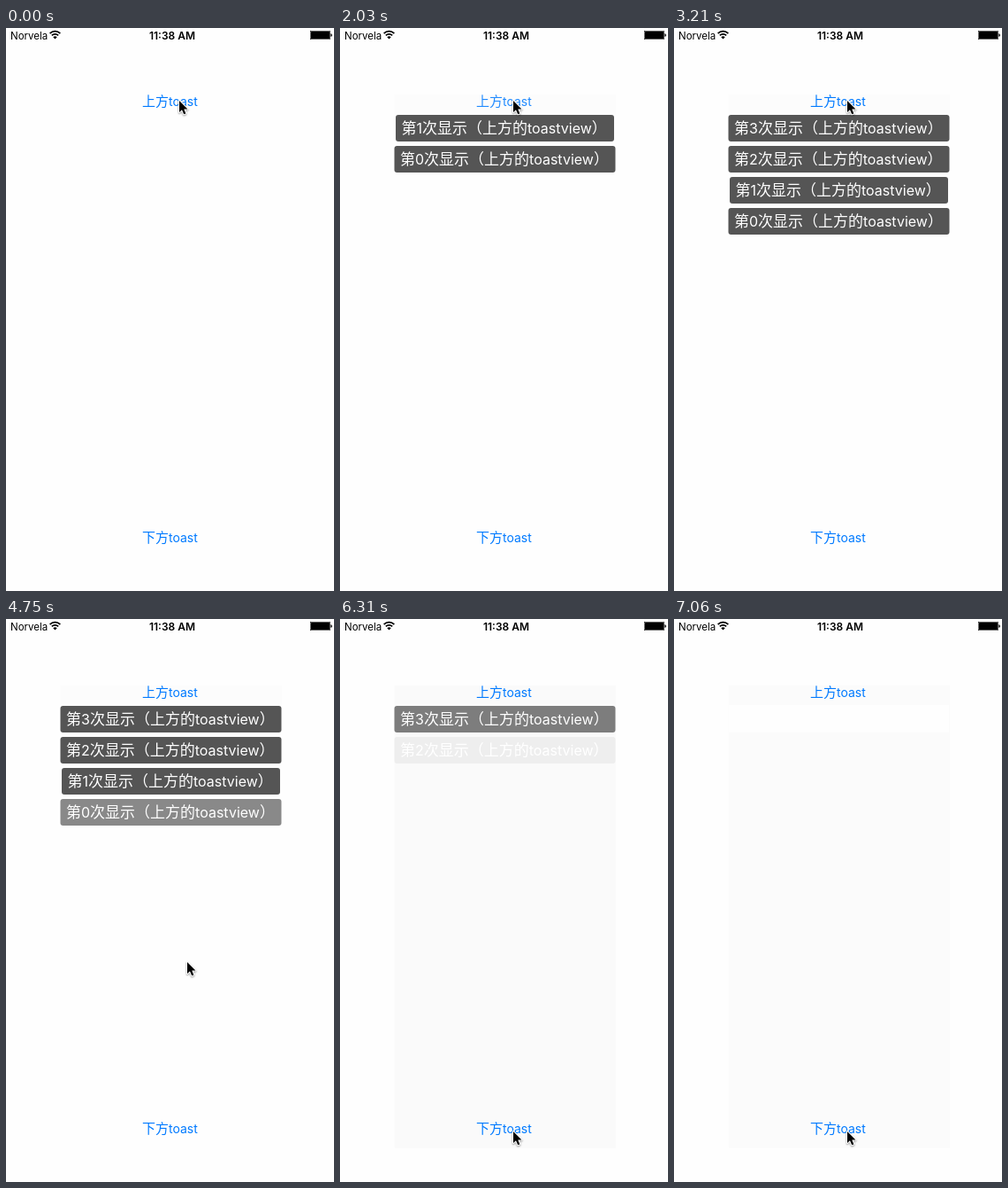
An HTML page with a canvas for the animation above (8 s loop, 371 px wide and 635 px high).

```html
<!DOCTYPE html>
<html lang="zh-CN">
<head>
<meta charset="utf-8">
<title>Toast stack</title>
<style>
  html, body { margin: 0; width: 100%; height: 100%; overflow: hidden; background: #fefefe; }
  canvas { display: block; width: 371px; height: 635px; }
</style>
</head>
<body>
<canvas id="stage"></canvas>
<script>
const WIDTH = 371, HEIGHT = 635, LOOP = 8000;
const PAPER = '#fefefe', BLUE = '#007aff';
const canvas = document.getElementById('stage');
const ctx = canvas.getContext('2d');
const ratio = window.devicePixelRatio || 1;
canvas.width = WIDTH * ratio;
canvas.height = HEIGHT * ratio;

const toasts = [
  { shown: 1400, fade: 4440, width: 250 },
  { shown: 1880, fade: 4920, width: 247 },
  { shown: 2200, fade: 5390, width: 250 },
  { shown: 3030, fade: 6070, width: 250 },
];
const FADE_TIME = 990;
const presses = [[1250, 1400], [1740, 1880], [2920, 3030]];

// Pointer stops: time, x, y
const pointerPath = [
  [0, 196, 82], [4370, 196, 82], [4720, 205, 387], [5180, 205, 387],
  [5720, 204, 566], [5930, 204, 569], [6120, 196, 578], [LOOP, 196, 578],
];

const clamp = v => Math.min(1, Math.max(0, v));
const smooth = v => v * v * (3 - 2 * v);

function pointerAt(t) {
  const i = pointerPath.findIndex(stop => t < stop[0]);
  const [t0, x0, y0] = pointerPath[i - 1], [t1, x1, y1] = pointerPath[i];
  const p = smooth((t - t0) / (t1 - t0));
  return { x: x0 + (x1 - x0) * p, y: y0 + (y1 - y0) * p };
}

function rect(x, y, w, h, color, radius = 0) {
  ctx.fillStyle = color;
  ctx.beginPath();
  ctx.roundRect(x, y, w, h, radius);
  ctx.fill();
}

function label(text, x, y, font, align = 'left') {
  ctx.font = font + ' Inter, sans-serif';
  ctx.textAlign = align;
  ctx.fillText(text, x, y);
}

// Chinese runs at full size, Latin runs one pixel smaller
function mixedText(text, x, y, size, color) {
  ctx.fillStyle = color;
  ctx.textAlign = 'left';
  for (const run of text.match(/[\x00-\x7f]+|[^\x00-\x7f]+/g)) {
    ctx.font = run.charCodeAt(0) < 128
      ? `${size - 1}px Inter, sans-serif`
      : `350 ${size}px "Noto Sans CJK SC", "Noto Sans CJK", sans-serif`;
    ctx.fillText(run, x, y);
    x += ctx.measureText(run).width;
  }
}

function drawStatusBar() {
  ctx.fillStyle = '#000';
  label('Norvela', 5, 12.5, '11.5px');
  label('11:38 AM', 188, 12.5, '600 12px', 'center');

  ctx.strokeStyle = '#000';
  ctx.lineWidth = 1.7;
  for (const radius of [8.3, 5.2]) {
    ctx.beginPath();
    ctx.arc(55.5, 12, radius, -Math.PI * 0.75, -Math.PI * 0.25);
    ctx.stroke();
  }
  ctx.beginPath();
  ctx.moveTo(55.5, 12.6);
  ctx.arc(55.5, 12.6, 3.2, -Math.PI * 0.75, -Math.PI * 0.25);
  ctx.fill();

  ctx.lineWidth = 0.6;
  ctx.strokeRect(344.3, 3.3, 22.4, 9.4);
  rect(345, 4, 21, 8, '#000', 0.5);
  rect(367.3, 6.3, 1.5, 3.4, '#000', [0, 1.5, 1.5, 0]);
}

function drawPanel(t, pointer) {
  if (t < 1400) return;
  if (t < 5210) return rect(61.5, 75, 250.5, 23, '#fcfcfc');
  rect(61.5, 75, 250.5, pointer.y + 18.5 - 75, t < 7060 ? '#fafafa' : '#fbfbfb');
  if (t >= 7060) rect(62, 97, 249, 31, PAPER);
}

function buttonAlpha(t) {
  const press = presses.find(([down, up]) => t >= down && t < up + 180);
  return press ? 0.2 + 0.8 * clamp((t - press[1]) / 180) : 1;
}

function drawToasts(t) {
  const visible = toasts.filter(toast => t >= toast.shown).length;
  toasts.forEach((toast, i) => {
    const alpha = 1 - clamp((t - toast.fade) / FADE_TIME);
    if (i >= visible || alpha === 0) return;
    const x = 186.5 - toast.width / 2, y = 98 + 35 * (visible - 1 - i);
    rect(x, y, toast.width, 30, `rgba(85, 85, 85, ${alpha})`, 3);
    mixedText(`第${i}次显示（上方的toastview）`, x + 6.5, y + 21.3, 17, '#fff');
  });
}

function drawPointer({ x, y }) {
  ctx.save();
  ctx.translate(x, y);
  ctx.beginPath();
  [[0, 0], [0, 13], [3, 10.2], [5.2, 15.3], [7.4, 14.4], [5.3, 9.5], [9.5, 9.5]]
    .forEach(point => ctx.lineTo(...point));
  ctx.closePath();
  ctx.lineJoin = 'round';
  ctx.lineWidth = 2;
  ctx.strokeStyle = '#fff';
  ctx.shadowColor = 'rgba(0, 0, 0, .4)';
  ctx.shadowBlur = 2 * ratio;
  ctx.shadowOffsetY = ratio;
  ctx.stroke();
  ctx.shadowColor = 'transparent';
  ctx.fillStyle = '#000';
  ctx.fill();
  ctx.restore();
}

function draw(now) {
  const t = now % LOOP;
  const pointer = pointerAt(t);
  ctx.setTransform(ratio, 0, 0, ratio, 0, 0);
  rect(0, 0, WIDTH, HEIGHT, PAPER);
  drawStatusBar();
  drawPanel(t, pointer);
  ctx.globalAlpha = buttonAlpha(t);
  mixedText('上方toast', 154, 87.5, 15, BLUE);
  ctx.globalAlpha = 1;
  mixedText('下方toast', 154, 579.5, 15, BLUE);
  drawToasts(t);
  drawPointer(pointer);
}

const start = performance.now();
function tick() {
  draw(performance.now() - start);
  requestAnimationFrame(tick);
}
tick();
</script>
</body>
</html>
```
